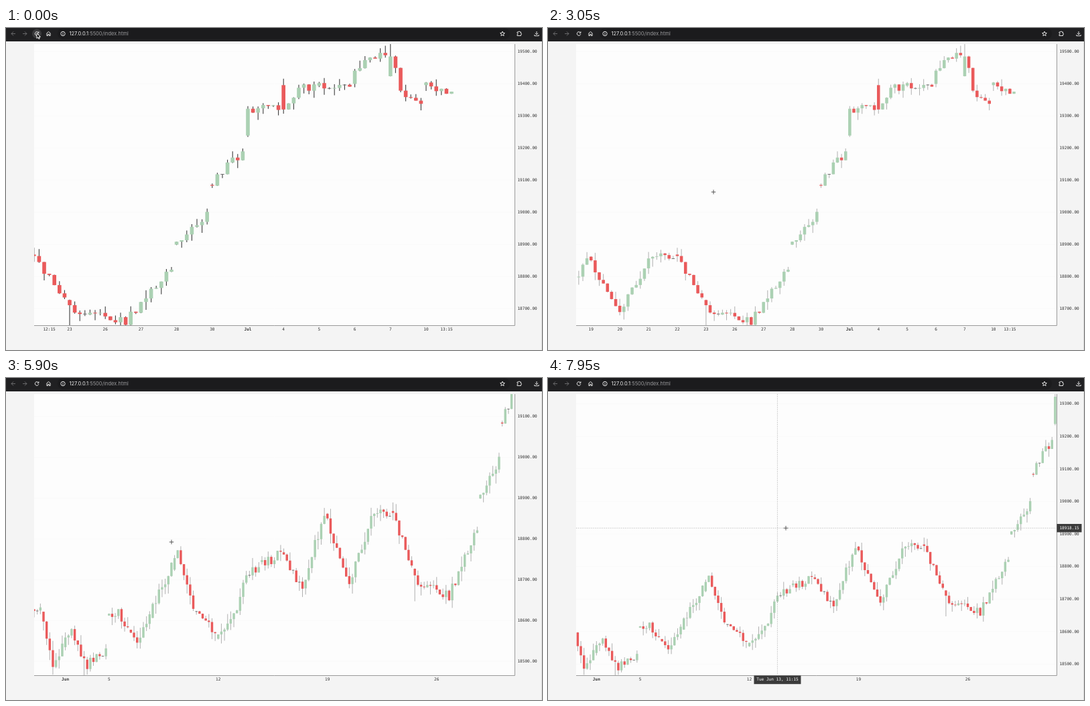
An HTML page with a canvas that plays this animation: 800x481 px, repeating every 8 s.

```html
<!DOCTYPE html>
<html lang="en">
<head>
<meta charset="utf-8">
<title>Candlestick chart</title>
<style>
  html, body { margin: 0; width: 100%; height: 100%; overflow: hidden; background: #f4f4f4; }
  canvas { display: block; width: 800px; height: 481px; }
</style>
</head>
<body>
<canvas id="stage"></canvas>
<script>
const canvas = document.getElementById('stage');
const ctx = canvas.getContext('2d');
const ratio = window.devicePixelRatio || 1;
canvas.width = 800 * ratio;
canvas.height = 481 * ratio;

const LOOP = 8000, DAYS = 34, SLOTS = 7, CANDLES = 237;
const LEFT = 42, RIGHT = 759.5, TOP = 24, BOTTOM = 444.5;
const MONO = '"DejaVu Sans Mono", monospace';

// Turning points of the price: [candle boundary, price]. A repeated boundary is an overnight gap.
const swings = [
  [0, 18400], [7, 18335], [19, 18225], [28, 18492], [28, 18608], [42, 18632], [46, 18497],
  [52, 18570], [57, 18490], [63, 18530], [63, 18615], [67, 18622], [73, 18547], [86, 18767],
  [91, 18625], [98, 18567], [105, 18614], [107, 18705], [119, 18765], [126, 18683],
  [133, 18860], [141, 18697], [149, 18866], [155, 18860], [163, 18690], [173, 18662],
  [182, 18820], [182, 18890], [189, 18992], [189, 19078], [196, 19190], [196, 19246],
  [197, 19318], [203, 19325], [203, 19406], [204, 19325], [207, 19388], [217, 19390],
  [218, 19450], [224, 19495], [224, 19422], [225, 19496], [227, 19381], [231, 19325],
  [231, 19405], [237, 19365]
];
// Wicks that reach the extremes setting the price scale, by candle index.
const longWicks = {
  18: 18203, 55: 18465, 73: 18531, 155: 18885, 161: 18647, 196: 19330, 222: 19510, 224: 19523
};

// [time, x of the newest candle, zoom level]; a repeated time is a hard change.
const viewKeys = [
  [0, 665, 2], [450, 665, 2], [450, 604.5, 0], [2150, 604.5, 0], [2150, 715, 1],
  [3050, 695.5, 1], [3300, 695.5, 1], [3700, 687, 1], [3700, 687, 2], [4300, 687, 2],
  [4300, 687, 0], [4950, 740, 0], [5300, 817.8, 0], [6600, 1124.2, 0], [6750, 1124.2, 0],
  [7100, 943.2, 0]
];
const cursorKeys = [
  [0, 46, 8], [550, 46, 8], [850, 52, 22], [1200, 247, 245], [6350, 247, 245],
  [6600, 300, 179], [6700, 272, 192], [7300, 265, 197], [7850, 312, 224.2], [7950, 355, 224.2]
];
const crosshairTimes = [[900, 1700], [6400, 6750], [7300, LOOP]];

const noise = n => { const v = Math.sin(n * 127.1 + 11.7) * 43758.5453; return v - Math.floor(v); };
const lerp = (a, b, p) => a + (b - a) * p;

function sample(keys, t) {
  const next = keys.findIndex(k => k[0] > t);
  if (next < 1) return keys.at(next).slice(1);
  const a = keys[next - 1], b = keys[next];
  const p = (t - a[0]) / (b[0] - a[0]);
  return a.slice(1).map((v, k) => lerp(v, b[k + 1], p));
}

// Each candle closes on the trend, give or take; every day opens afresh.
function makeCandles() {
  const trend = pos => sample(swings, pos)[0];
  const jitter = seed => (noise(seed) - 0.5) * 26;
  const candles = [];
  for (let i = 0; i < CANDLES; i++) {
    const open = i % SLOTS ? candles[i - 1].close : trend(i) + jitter(i + 300);
    const close = trend(i + 1 - 1e-6) + jitter(i);
    const top = Math.max(open, close), base = Math.min(open, close);
    const candle = {
      open, close, top, base,
      high: top + noise(i + 500) ** 2 * 26,
      low: base - noise(i + 900) ** 2 * 26
    };
    const reach = longWicks[i];
    if (reach > top) candle.high = candle.top = reach;
    if (reach < base) candle.low = candle.base = reach;
    candles.push(candle);
  }
  return candles;
}

function tradingDays() {
  const days = [];
  for (let d = new Date(Date.UTC(2023, 4, 23)); days.length < DAYS; d = new Date(+d + 864e5)) {
    const holiday = d.getUTCMonth() === 5 && d.getUTCDate() === 29;
    if (d.getUTCDay() % 6 && !holiday) days.push(d);
  }
  return days;
}

const days = tradingDays();
const candles = makeCandles();
const monthName = d => d.toLocaleString('en-US', { month: 'short', timeZone: 'UTC' });
const dayName = d => d.toLocaleString('en-US', { weekday: 'short', timeZone: 'UTC' });
const slotTime = slot => String(9 + slot).padStart(2, '0') + ':15';

function rect(x, y, w, h, color) {
  ctx.fillStyle = color;
  ctx.fillRect(x, y, w, h);
}
function line(x1, y1, x2, y2, color, width = 1, dash = []) {
  ctx.strokeStyle = color;
  ctx.lineWidth = width;
  ctx.setLineDash(dash);
  ctx.beginPath();
  ctx.moveTo(x1, y1);
  ctx.lineTo(x2, y2);
  ctx.stroke();
  ctx.setLineDash([]);
}
function text(str, x, y, color, align = 'left', font = '6.1px ' + MONO) {
  ctx.font = font;
  ctx.textAlign = align;
  ctx.textBaseline = 'middle';
  ctx.fillStyle = color;
  ctx.fillText(str, x, y);
}
function icon(d, x, y, color = '#e3e3e3', fill = false) {
  ctx.save();
  ctx.translate(x, y);
  ctx.lineWidth = 1;
  ctx.strokeStyle = ctx.fillStyle = color;
  const path = new Path2D(d);
  if (fill) ctx.fill(path);
  else ctx.stroke(path);
  ctx.restore();
}
function clip(x, y, w, h, draw) {
  ctx.save();
  ctx.beginPath();
  ctx.rect(x, y, w, h);
  ctx.clip();
  draw();
  ctx.restore();
}

function drawToolbar(t) {
  rect(0, 0, 800, 20, '#202022');
  ctx.fillStyle = '#1b1b1d';
  ctx.beginPath();
  ctx.roundRect(77, 0, 675, 17, 8.5);
  ctx.fill();
  icon('M3 0H-3M0 -3L-3 0L0 3', 11, 8.5, '#6a6a6c');
  icon('M-3 0H3M0 -3L3 0L0 3', 28, 8.5, '#6a6a6c');
  if (t < 700) icon('M-7 0a7 7 0 1 0 14 0a7 7 0 1 0 -14 0', 46, 8.5, '#3a3a3c', true);
  icon('M2.4 -1.6A2.8 2.8 0 1 0 2.8 .6M2.9 -3.2V-1H.7', 46, 8.5);
  icon('M-2.6 3V-.8L0 -3L2.6 -.8V3H.9V.8H-.9V3Z', 63.5, 8.5);
  icon('M-3.2 0a3.2 3.2 0 1 0 6.4 0a3.2 3.2 0 1 0 -6.4 0M0 -.4V1.8M0 -1.9V-1.1', 85, 8.5);
  icon('M0 -3.4L1 -1.1L3.4 -.9L1.6 .7L2.1 3.1L0 1.8L-2.1 3.1L-1.6 .7L-3.4 -.9L-1 -1.1Z', 741, 8.5);
  icon('M-3 -2H-1A1 1 0 0 1 1 -2H2.5V0A1 1 0 0 1 2.5 2V3.5H-3V1.7A1 1 0 0 0 -3 -.3Z', 766, 8);
  icon('M0 -3.5V1.2M-2.2 -.8L0 1.4L2.2 -.8M-3.2 1.5V3.2H3.2V1.5', 792, 8.5);
  const font = '7.5px Inter, sans-serif', host = '127.0.0.1';
  text(host, 94.5, 8.8, '#f0f0f0', 'left', font);
  text(':5500/index.html', 94.5 + ctx.measureText(host).width, 8.8, '#9a9a9c', 'left', font);
}

function drawDateAxis(xOf, spacing) {
  const daily = spacing > 6;
  const label = (str, x, bold) => {
    if (x >= LEFT && x <= RIGHT - 8) text(str, x, 450.5, '#333', 'center', (bold ? 'bold ' : '') + '6.1px ' + MONO);
  };
  days.forEach((d, i) => {
    const x = xOf(i * SLOTS);
    const newMonth = i > 0 && d.getUTCMonth() !== days[i - 1].getUTCMonth();
    if (newMonth) label(monthName(d), x, true);
    else if (daily || d.getUTCDay() === 1) label(d.getUTCDate(), x);
    if (!daily) return;
    if (x < LEFT) label(slotTime(3), x + 3 * spacing);
    if (i === days.length - 1) label(slotTime(4), x + 4 * spacing);
  });
}

function drawCandle(c, x, yOf, spacing) {
  const width = spacing * 0.74;
  const yOpen = yOf(c.open), yClose = yOf(c.close);
  const near = spacing > 7;
  line(x, yOf(c.high), x, yOf(c.low), near ? '#3c3c3c' : '#a8a8a8', near ? 1.1 : 0.9);
  const height = Math.abs(yOpen - yClose);
  if (height < 0.8) line(x - width / 2, yOpen, x + width / 2, yOpen, '#666', 0.9);
  else rect(x - width / 2, Math.min(yOpen, yClose), width, height, c.close > c.open ? '#abd1b3' : '#ea5a5b');
}

// The crosshair trails the cursor a little and snaps to the nearest candle.
function drawCrosshair(t, last, spacing, xOf, priceOf) {
  const [cx, cy] = sample(cursorKeys, t - 30);
  if (cy < TOP || cx < LEFT) return;
  const i = Math.min(CANDLES - 1, CANDLES - 1 - Math.round((last - cx) / spacing));
  const x = xOf(i), day = days[Math.floor(i / SLOTS)];
  line(LEFT, cy, RIGHT, cy, '#9c9c9c', 0.7, [1.2, 1.6]);
  line(x, TOP, x, BOTTOM, '#9c9c9c', 0.7, [1.2, 1.6]);
  rect(RIGHT, cy - 6.2, 37, 12.4, '#3b3b3b');
  text((Math.round(priceOf(cy) * 20) / 20).toFixed(2), 763.4, cy + 0.3, '#fff');
  rect(x - 35, BOTTOM, 70, 12.7, '#3b3b3b');
  const date = String(day.getUTCDate()).padStart(2, '0');
  text(`${dayName(day)} ${monthName(day)} ${date}, ${slotTime(i % SLOTS)}`, x, 450.8, '#fff', 'center');
}

function drawChart(t) {
  const [last, zoom] = sample(viewKeys, t);
  const spacing = 4.657 + 1.4715 * zoom;
  const xOf = i => last - (CANDLES - 1 - i) * spacing;
  const visible = candles.filter((c, i) => xOf(i) >= LEFT && xOf(i) <= 757.1);
  const max = Math.max(...visible.map(c => c.top));
  const min = Math.min(...visible.map(c => c.base));
  const scale = (BOTTOM - TOP) / (max - min);
  const yOf = price => TOP + (max - price) * scale;
  const priceOf = y => max - (y - TOP) / scale;

  rect(LEFT, TOP, RIGHT - LEFT, BOTTOM - TOP, '#fdfdfd');
  clip(LEFT, TOP, 758, 433, () => {
    for (let p = Math.floor(max / 100) * 100; yOf(p) < 464; p -= 100) {
      if (yOf(p) < BOTTOM) line(LEFT, yOf(p), RIGHT, yOf(p), '#fafafa');
      text(p.toFixed(2), 763.4, yOf(p) + 0.2, '#333');
    }
  });
  clip(LEFT, TOP, RIGHT - LEFT, BOTTOM - TOP, () => {
    candles.forEach((c, i) => {
      const x = xOf(i);
      if (x > 38 && x <= 757.1) drawCandle(c, x, yOf, spacing);
    });
  });
  line(RIGHT, TOP, RIGHT, BOTTOM, '#9a9a9a');
  line(LEFT, BOTTOM, RIGHT, BOTTOM, '#9a9a9a');
  drawDateAxis(xOf, spacing);
  if (crosshairTimes.some(([from, to]) => t >= from && t < to)) drawCrosshair(t, last, spacing, xOf, priceOf);
}

function drawCursor(t) {
  const [x, y] = sample(cursorKeys, t);
  if (y < TOP) {
    const arrow = 'M0 0V7.4L1.8 5.8L3 8.4L4.2 7.8L3.1 5.3H5.4Z';
    icon(arrow, x, y, '#000', true);
    icon(arrow, x, y, '#fff');
    return;
  }
  const plus = [[x - 3.3, y, x + 3.3, y], [x, y - 3.3, x, y + 3.3]];
  plus.forEach(p => line(...p, '#fff', 2));
  plus.forEach(p => line(...p, '#444', 0.9));
}

function frame(now) {
  const t = now % LOOP;
  ctx.setTransform(ratio, 0, 0, ratio, 0, 0);
  rect(0, 0, 800, 481, '#f4f4f4');
  rect(799, 20, 1, 461, '#dcdcdc');
  drawToolbar(t);
  drawChart(t);
  drawCursor(t);
  requestAnimationFrame(frame);
}
frame(0);
</script>
</body>
</html>
```
